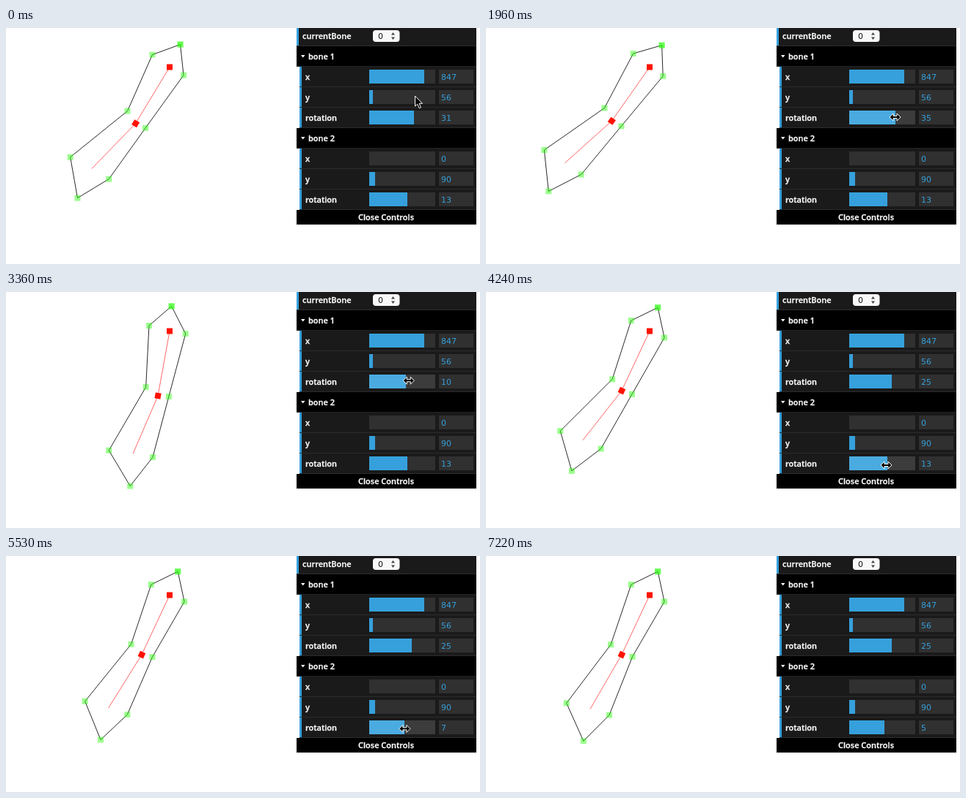
Animation, 646 px wide and 323 px high, one loop 8000 ms. Source, as an HTML page:

```html
<!DOCTYPE html>
<html lang="en">
<head>
<meta charset="utf-8">
<title>Bone controls</title>
<style>
  html, body { margin: 0; width: 100%; height: 100%; overflow: hidden; background: #fff; }
  svg { display: block; }
  text { font: 600 11px "Open Sans", "Noto Sans", sans-serif; fill: #fff; stroke: #fff; stroke-width: .3px; }
  .num { font: 11px "DejaVu Sans", sans-serif; fill: #36a0dc; stroke: none; }
  .track { fill: #303030; }
  .fill { fill: #36a0dc; }
  .hover .track { fill: #3c3c3c; }
  .hover .fill { fill: #4aabe0; }
</style>
</head>
<body>
<svg id="stage" width="646" height="323" viewBox="0 0 646 323"></svg>
<script>
const LOOP = 8000;
const stage = document.getElementById('stage');

function add(parent, tag, attrs, text) {
  const el = document.createElementNS('http://www.w3.org/2000/svg', tag);
  for (const k in attrs) el.setAttribute(k, attrs[k]);
  if (text !== undefined) el.textContent = text;
  return parent.appendChild(el);
}
const box = (parent, x, y, width, height, fill) =>
  add(parent, 'rect', { x, y, width, height, fill });
const label = (parent, x, y, text) => add(parent, 'text', { x, y }, text);

// Progress 0..1 in equal jumps: the first at `from`, the last at `until`
function stepped(t, { from, until = from, steps = 1 }) {
  if (t < from) return 0;
  if (t >= until) return 1;
  return (1 + Math.floor((t - from) / (until - from) * (steps - 1) + 1e-6)) / steps;
}

// Each sweep eases from the previous angle to its own
const SPIN1 = { start: 31, sweeps: [
  { from: 1960, to: 35 },
  { from: 2130, until: 2310, steps: 3, to: 15 },
  { from: 2670, until: 2920, steps: 4, to: -12, power: 1.5 },
  { from: 3100, until: 3450, steps: 5, to: 25 }
] };
const SPIN2 = { start: 13, sweeps: [
  { from: 4600, to: 10 },
  { from: 4860, until: 5120, steps: 4, to: -21 },
  { from: 5390, to: -14 },
  { from: 5530, until: 5730, steps: 3, to: 15, power: .3 },
  { from: 5910, until: 6520, steps: 8, to: -30.5 },
  { from: 6610, until: 6860, steps: 4, to: 5, power: .7 }
] };
const angle = (spin, t) => spin.sweeps.reduce(
  (v, s) => v + (s.to - v) * stepped(t, s) ** (s.power || 1), spin.start);

// Skeleton and skin, in each bone's own space
const ROOT = [223, 53.5], UPPER = 90, LOWER = 86;
const SKIN1 = [[-28.9, -2.4], [-3.5, -34], [22, -0.3]];
const SKIN2 = [[14, -4.9], [26.6, 80], [13.9, 128.4], [-32, 95], [-19.8, -4.5]];

function turn([x, y], deg, [ox, oy]) {
  const a = deg * Math.PI / 180, c = Math.cos(a), s = Math.sin(a);
  return [ox + x * c - y * s, oy + x * s + y * c];
}
const pointList = pts => pts.map(p => p.join()).join(' ');

const outline = add(stage, 'polygon', { fill: 'none', stroke: '#2a2a2a', 'stroke-width': 1 });
// one extra handle doubles the tip
const handles = Array.from({ length: 9 }, () =>
  box(stage, -4, -4, 8, 8, 'rgba(40,255,10,.46)'));
const bones = add(stage, 'polyline', { fill: 'none', stroke: 'rgba(255,0,0,.6)', 'stroke-width': 1 });
box(stage, ROOT[0] - 4, ROOT[1] - 4, 8, 8, '#f10');
const joint = box(stage, -4, -4, 8, 8, '#f10');

function pose(r1, r2) {
  const elbow = turn([0, UPPER], r1, ROOT), sum = r1 + r2;
  const skin = [
    ...SKIN1.map(p => turn(p, r1, ROOT)),
    ...SKIN2.map(p => turn(p, sum, elbow))
  ];
  outline.setAttribute('points', pointList(skin));
  handles.forEach((h, i) => h.setAttribute('transform', `translate(${skin[i] || skin[1]})`));
  bones.setAttribute('points', pointList([ROOT, elbow, turn([0, LOWER], sum, elbow)]));
  joint.setAttribute('transform', `translate(${elbow}) rotate(${r1})`);
}

// Control panel
const LEFT = 396, RIGHT = 641, INDENT = 4, TRACK = 495, ROW = 28, BLUE = '#36a0dc';
const panel = add(stage, 'g', {});

function row(x, y, color, line) {
  const g = add(panel, 'g', {});
  box(g, x, y, RIGHT - x, ROW, color);
  box(g, x, y + ROW - 1, RIGHT - x, 1, line);
  return g;
}

function slider(y, text, value, width) {
  const g = row(LEFT + INDENT, y, '#1a1a1a', '#2c2c2c');
  box(g, LEFT + INDENT, y, 3, ROW - 1, BLUE);
  label(g, 408, y + 18, text);
  add(g, 'rect', { x: TRACK, y: y + 4, width: 90, height: 19, class: 'track' });
  const fill = add(g, 'rect', { x: TRACK, y: y + 4, width, height: 19, class: 'fill' });
  box(g, 590, y + 4, 47, 19, '#303030');
  const num = add(g, 'text', { x: 593, y: y + 18, class: 'num' }, value);
  return { g, fill, num };
}

// Builds a folder and returns its rotation slider
function folder(top, name, x, xWidth, y, yWidth) {
  const g = row(LEFT, top, '#000', '#222');
  add(g, 'path', { d: `M402 ${top + 12}h5.5l-2.75 3.5z`, fill: '#fff' });
  label(g, 412, top + 18, name);
  slider(top + ROW, 'x', x, xWidth);
  slider(top + ROW * 2, 'y', y, yWidth);
  return slider(top + ROW * 3, 'rotation', 0, 0);
}

const angleWidth = deg => (deg + 90) / 2;

function setSlider(s, deg, hover) {
  s.fill.setAttribute('width', Math.round(angleWidth(deg)));
  s.num.textContent = String(Math.round(deg)).replace('-', '–');
  s.g.setAttribute('class', hover ? 'hover' : '');
}

const top0 = row(LEFT, 25 - ROW, '#1a1a1a', '#2c2c2c');
box(top0, LEFT, 0, 3, 24, BLUE);
label(top0, 404, 15, 'currentBone');
add(top0, 'rect', { x: 500, y: 3, width: 36.5, height: 16, rx: 4, fill: '#f8f8f8' });
add(top0, 'text', { x: 507, y: 15, class: 'num', style: 'fill:#111' }, '0');
add(top0, 'path', { d: 'M525 9.5h5l-2.5-3.5zM525 12.5h5l-2.5 3.5z', fill: '#444' });

const dial1 = folder(25, 'bone 1', 847, 75, 56, 5);
const dial2 = folder(137, 'bone 2', 0, 0, 90, 8);
box(panel, LEFT, 249, RIGHT - LEFT, 20, '#000');
add(panel, 'text', { x: 518, y: 263, 'text-anchor': 'middle' }, 'Close Controls');

// Pointers
const ink = { fill: '#000', stroke: '#fff', 'stroke-width': 1, 'stroke-linejoin': 'round' };
const arrow = add(stage, 'path', {
  ...ink, d: 'M0 0V14L3.2 11.2L5.7 16.8L8 15.8L5.6 10.3H10Z'
});
const resize = add(stage, 'path', {
  ...ink, d: 'M-7.5 0L-2.5-5V-1.5H2.5V-5L7.5 0L2.5 5V1.5H-2.5V5Z'
});

function curve(p, a, b, c) {
  const mix = i => a[i] * (1 - p) ** 2 + 2 * b[i] * p * (1 - p) + c[i] * p * p;
  return { x: mix(0), y: mix(1) };
}

// The pointer runs slightly ahead of the value it drags
const LEAD = 82;
const dragX = (spin, t) => TRACK + angleWidth(angle(spin, t + LEAD));

function pointer(t) {
  if (t < 1960) {
    const p = stepped(t, { from: 90, until: 790, steps: 9 });
    return { ...curve(p, [557.5, 93], [567, 100], [557.5, 121]), dial: 0 };
  }
  if (t < 3810) {
    const x = dragX(SPIN1, t);
    return { x, y: 121 + (x - 546) / 12, dial: 1 };
  }
  if (t < 4600) {
    const p = stepped(t, { from: 3810, until: 4240, steps: 6 });
    return { ...curve(p, [552, 122], [409, 330], [545.5, 237]), dial: p < 1 ? 0 : 2 };
  }
  if (t < 7130) {
    const x = dragX(SPIN2, t);
    return { x, y: 236 + (546 - x) / 7, dial: 2 };
  }
  return { x: 560, y: t < 7220 ? 301 : 400, dial: 0 };
}

function draw(t) {
  const r1 = angle(SPIN1, t), r2 = angle(SPIN2, t);
  const { x, y, dial } = pointer(t);
  pose(r1, r2);
  setSlider(dial1, r1, dial === 1);
  setSlider(dial2, r2, dial === 2);
  arrow.setAttribute('visibility', dial ? 'hidden' : 'visible');
  resize.setAttribute('visibility', dial ? 'visible' : 'hidden');
  for (const el of [arrow, resize]) el.setAttribute('transform', `translate(${x} ${y})`);
}

const start = performance.now();
function tick() {
  draw((performance.now() - start) % LOOP);
  requestAnimationFrame(tick);
}
tick();
</script>
</body>
</html>
```
